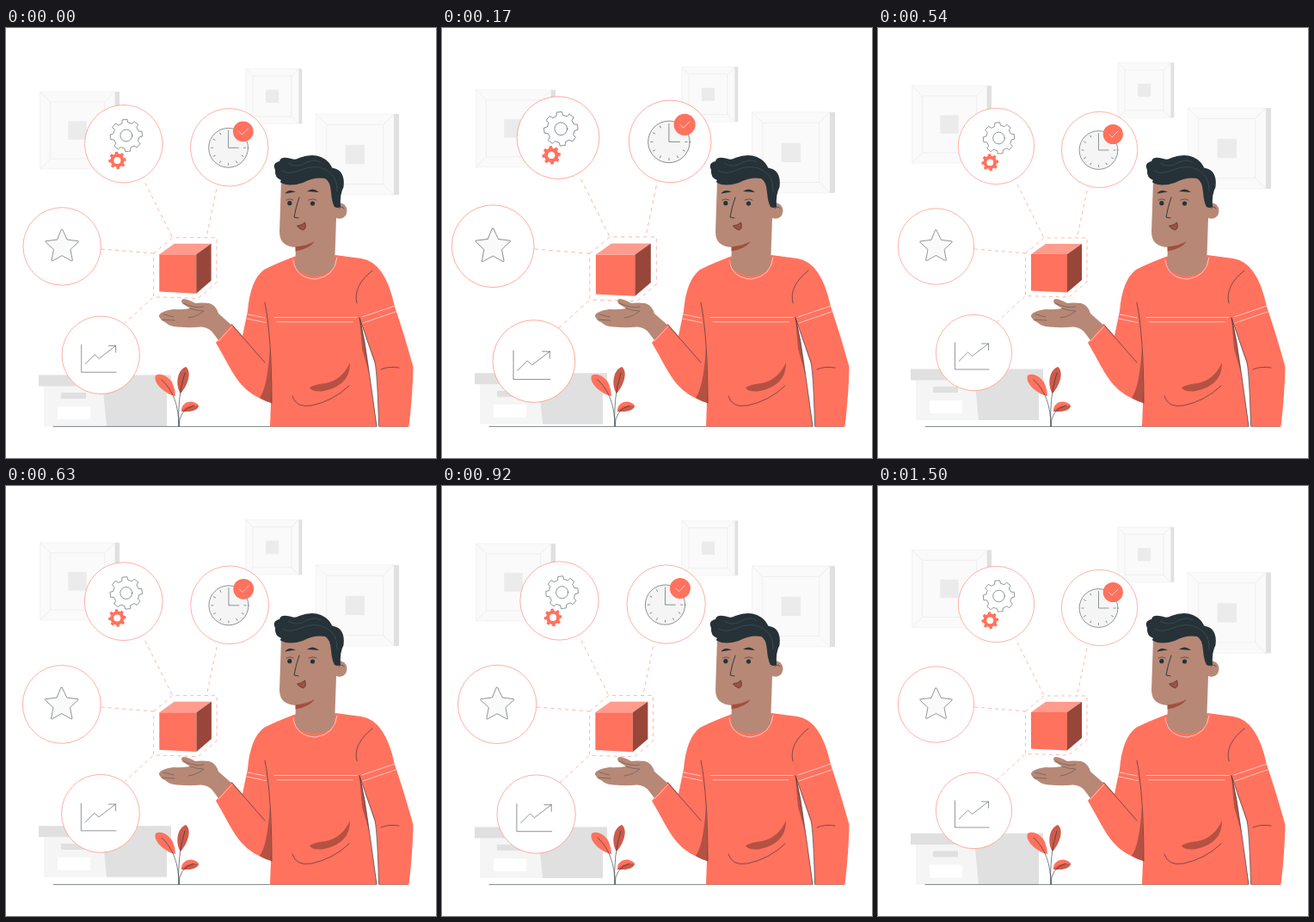
An HTML page that plays this animation: 500 px wide and 500 px high, repeating every 1.54 s.

```html
<!DOCTYPE html>
<html lang="en">
<head>
<meta charset="utf-8">
<title>Presenting a product</title>
<style>
  html, body { margin: 0; width: 100%; height: 100%; overflow: hidden; background: #fff; }
  svg { display: block; width: 100vw; height: 100vh; }
  .coral { fill: #ff725e; }
  .shade { fill: #b55142; }
  .skin { fill: #b78876; }
  .dark { fill: #263238; }
  .ink { fill: none; stroke: #263238; stroke-width: .6; stroke-linecap: round; stroke-linejoin: round; }
  .white { fill: none; stroke: #fff; stroke-width: .6; stroke-linecap: round; }
  .dash { fill: none; stroke: #ff725e; stroke-width: .5; stroke-dasharray: 4 4; }
  .bubble { fill: #fff; stroke: #ff725e; stroke-width: .55; }
  .grey { fill: #e0e0e0; }
  #idea .ink { stroke-width: .5; }
</style>
</head>
<body>
<svg viewBox="0 0 500 500">
  <g id="room">
    <g id="frames"></g>
    <path fill="#f5f5f5" d="M44 417H117V463.5H44z"/>
    <path class="grey" d="M38 404H192V417H187V463.5H117L112.5 417H38z"/>
    <path class="grey" d="M64 424.5H93V431.5H64z"/>
    <path fill="#fff" d="M60 440.5H98V455.5H60z"/>
  </g>

  <path class="ink" d="M55 463.4H467"/>

  <g id="plant">
    <path class="coral" d="M174 404C181 400 191 407 194 414Q197 421 197 428C188 427 170 414 174 404z"/>
    <path fill="#cc5b4b" d="M209 394C215 398 214 412 203 425C197 417 198 398 209 394z"/>
    <path class="coral" d="M204 446C203 438 211 433 218 435Q224 437 224 440C222 446 212 446 204 446z"/>
    <path fill="#cc5b4b" d="M204 446C208 440 216 438 224 439.500C221 446 212 446 204 446z"/>
    <path class="ink" d="M181 409Q201 427 201 463M208 401Q199 430 201 463M218 439Q201 444 201 463"/>
  </g>

  <g id="man">
    <path class="skin" d="M264 347L247 332Q244 322 236 320Q227 319 220 320Q211 315 206 315Q202 317 206 321L214 326Q204 328 195 327Q186 328 181 331Q176 334 179 337Q181 341 185 342Q190 347 199 347.500Q215 349 227 347.500Q236 348 241 355L250 367z"/>
    <path class="ink" d="M206 320Q222 327 230 324M214 326Q222 329 229 329M183 333L195 336M182 339L196 340M230 329Q222 336 212 337" opacity=".6"/>
    <path class="coral" d="M336 265.500Q309 276 300 281Q284 293 281 329L275 358L262.500 344L244 366C256 386 264 404 274 415Q285 428 308 436L307 463.500H431.500L428 436L433.500 463.500H468.500Q473 425 473.500 394Q463 356 452 324Q441 272 413 268L383 264Q360 278 336 265.500z"/>
    <path class="shade" d="M307 372L309 436Q301 434 295 430Q304 418 307 372z"/>
    <path class="shade" d="M411 338L419 365L426 415L414 373z"/>
    <path fill="#fff" d="M413 343L429 390Q432 400 433.500 464H431.300L424 412L417 365z"/>
    <path class="shade" d="M400 389Q391 409 372 413Q360 414 353 418Q355 423 367 422.500Q388 419 396 406Q400 399 400 389z"/>
    <path class="ink" d="M301 319Q309 359 309 436M262.500 345L301 389M411 337L429 389Q432 405 433.500 463M411 337L417 365L424 412L431 463M426 282Q403 300 408 320M436 397Q445 393 457 395M333 428Q337 442 355 439Q380 434 399 416"/>
    <path class="white" d="M312 336.500H408M315 341.800H403M281 333L301 337M280 338L302 342.500M414 336L451 323.500M415 343L453 330M247 364L263 347"/>

    <path class="skin" d="M320 178L318 237Q318 254 337 255L336 279Q346 288 360 288.500Q376 287 382 278L384 221Q395 224 396.500 213Q396 203 386 203L382 178Q350 160 320 178z"/>
    <path fill="#a24f3f" d="M336.500 254.500Q350 253 359 248Q353 257 336.500 259.500z"/>
    <path class="white" d="M334 270Q337 291 360 292Q382 289 385 267"/>
    <path class="ink" style="stroke-width:.9" d="M341 197Q337 208 335 220L340 221"/>
    <path class="ink" d="M387 210Q391 206 393 210"/>
    <path class="dark" d="M313 165Q309 157 318 155Q319 149 330 151.500Q336 154 341 151Q362 143 375 156Q379 161 379 162.500Q395 165 392.500 185Q388 193 389 208Q386 210 382 208Q379 203 378 191Q377 178 371 175Q359 173 345 180Q329 185 320 180Q318 179 320 177Q312 174 313 165z"/>
    <path fill="none" stroke="#455a64" stroke-width=".6" d="M321 166Q330 171 343 165Q360 158 372 165Q386 172 385 190M328 157Q338 164 350 156Q359 152 366 156"/>
    <path class="dark" d="M324.500 192.500Q328 186.500 337 190.500Q331 191.500 324.500 192.500zM350 190Q357 184.500 364 191Q357 190.500 350 190z"/>
    <circle class="dark" cx="329.800" cy="203.700" r="2.600"/>
    <circle class="dark" cx="356.500" cy="204" r="2.600"/>
    <path class="ink" d="M326 200Q330 197.500 334 200M352 200Q357 197.500 361 200"/>
    <path fill="#a24f3f" stroke="#263238" stroke-width=".6" d="M338.500 230Q344 229.500 347.500 226Q350 233 345.500 235Q341 234 338.500 230z"/>
  </g>

  <g id="idea">
    <path class="dash" d="M162 182L193 244M243 189L231.500 244M112 257L171.500 262M138 342L171.500 311.500M171.500 262L193 244H243V295L222 313L171.500 311.500z"/>
    <path class="coral" d="M178 263H220V307.500L178 305.500z"/>
    <path fill="#ff9c8e" d="M178 263L195 251H237L220 263z"/>
    <path fill="#99463a" d="M220 263L237 251V293L220 307.500z"/>

    <circle class="bubble" cx="137.500" cy="137.500" r="44.200"/>
    <path id="bigGear" class="ink"/>
    <circle class="ink" cx="140.500" cy="128" r="6.800"/>
    <path id="smallGear" class="coral"/>
    <circle fill="#fff" cx="130.300" cy="156.300" r="3.900"/>

    <circle class="bubble" cx="257.600" cy="141.500" r="44.200"/>
    <circle class="ink" style="fill:#f5f5f5" cx="256.500" cy="142" r="22.400"/>
    <g id="ticks" class="ink"></g>
    <path class="ink" d="M256.500 125.500V142H268"/>
    <circle class="coral" cx="273.300" cy="123.500" r="11.600"/>
    <path class="white" d="M268.500 123.500L272 127L279 120"/>

    <circle class="bubble" cx="67.500" cy="254" r="44.200"/>
    <path id="star" class="ink" style="fill:#fafafa"/>

    <circle class="bubble" cx="111.500" cy="377.500" r="44.200"/>
    <path class="ink" d="M89.500 366V397H129M94 387.500L104.500 377L109.500 381.500L128.500 367M120.500 367H128.500V374.500"/>
  </g>
</svg>

<script>
const LOOP = 1540, LEAD = 35;
const $ = id => document.getElementById(id);

// Closed outline through points given as [angle, radius] around a centre.
const polar = (cx, cy, points) => 'M' + points.map(([a, r]) =>
  `${(cx + r * Math.sin(a)).toFixed(2)} ${(cy - r * Math.cos(a)).toFixed(2)}`).join('L') + 'z';

// Repeats one [fraction of a step, radius] profile around a centre.
function rosette(cx, cy, count, turn, profile) {
  const step = 2 * Math.PI / count, points = [];
  for (let i = 0; i < count; i++)
    for (const [k, r] of profile) points.push([turn + (i + k) * step, r]);
  return polar(cx, cy, points);
}
const tooth = (outer, inner) => [[-.3, inner], [-.2, outer], [.2, outer], [.3, inner]];

function pictureFrame(x, y, w, h, side) {
  const m = w * .137, c = w * .247, r = x + w, b = y + h;
  return `<path class="grey" d="M${r} ${y}h${side}v${h}h${-side}z"/>
    <path fill="#fafafa" stroke="#ebebeb" stroke-width=".5" d="M${x} ${y}h${w}v${h}h${-w}z"/>
    <path fill="none" stroke="#e6e6e6" stroke-width=".6" d="M${x + m} ${y + m}H${r - m}V${b - m}H${x + m}z
      M${x} ${y}l${m} ${m}M${r} ${y}l${-m} ${m}M${x} ${b}l${m} ${-m}M${r} ${b}l${-m} ${-m}"/>
    <path fill="#ebebeb" d="M${x + (w - c) / 2} ${y + (h - c) / 2}h${c}v${c}h${-c}z"/>`;
}

$('frames').innerHTML = pictureFrame(39.5, 74.5, 87, 90, 5.5)
  + pictureFrame(278.8, 47.8, 61.5, 64, 4)
  + pictureFrame(360.5, 100.5, 90.5, 94, 6);
$('bigGear').setAttribute('d', rosette(140.5, 128, 8, -.1, tooth(18.3, 14.8)));
$('smallGear').setAttribute('d', rosette(130.3, 156.3, 8, -.1, tooth(10, 7.8)));
$('star').setAttribute('d', rosette(67.5, 254.5, 5, 0, [[-.02, 19.6], [.02, 19.6], [.5, 10]]));
$('ticks').innerHTML = Array.from({ length: 12 }, (_, i) =>
  `<path d="M256.500 122.500v2" transform="rotate(${i * 30} 256.500 142)"/>`).join('');

// Piecewise linear value through [position, value] stops.
function tween(stops, p) {
  const i = Math.max(1, stops.findIndex(([at]) => at >= p));
  const [[a, from], [b, to]] = [stops[i - 1], stops[i]];
  return from + (to - from) * (p - a) / (b - a);
}
const beat = [[0, 1], [.1, 1.1], [.3, 1], [.4, 1], [.5, 1.085], [.7, 1], [1, 1]];
const floating = [[0, 0], [.5, -10], [1, 0]];

function draw(now) {
  const p = (now + LEAD) % LOOP / LOOP;
  $('room').setAttribute('transform', `translate(0 ${tween(floating, p)})`);
  $('idea').setAttribute('transform',
    `translate(167.3 257.5) scale(${tween(beat, p)}) translate(-167.3 -257.5)`);
}

const start = performance.now();
function tick() {
  draw(performance.now() - start);
  requestAnimationFrame(tick);
}
tick();
</script>
</body>
</html>
```
